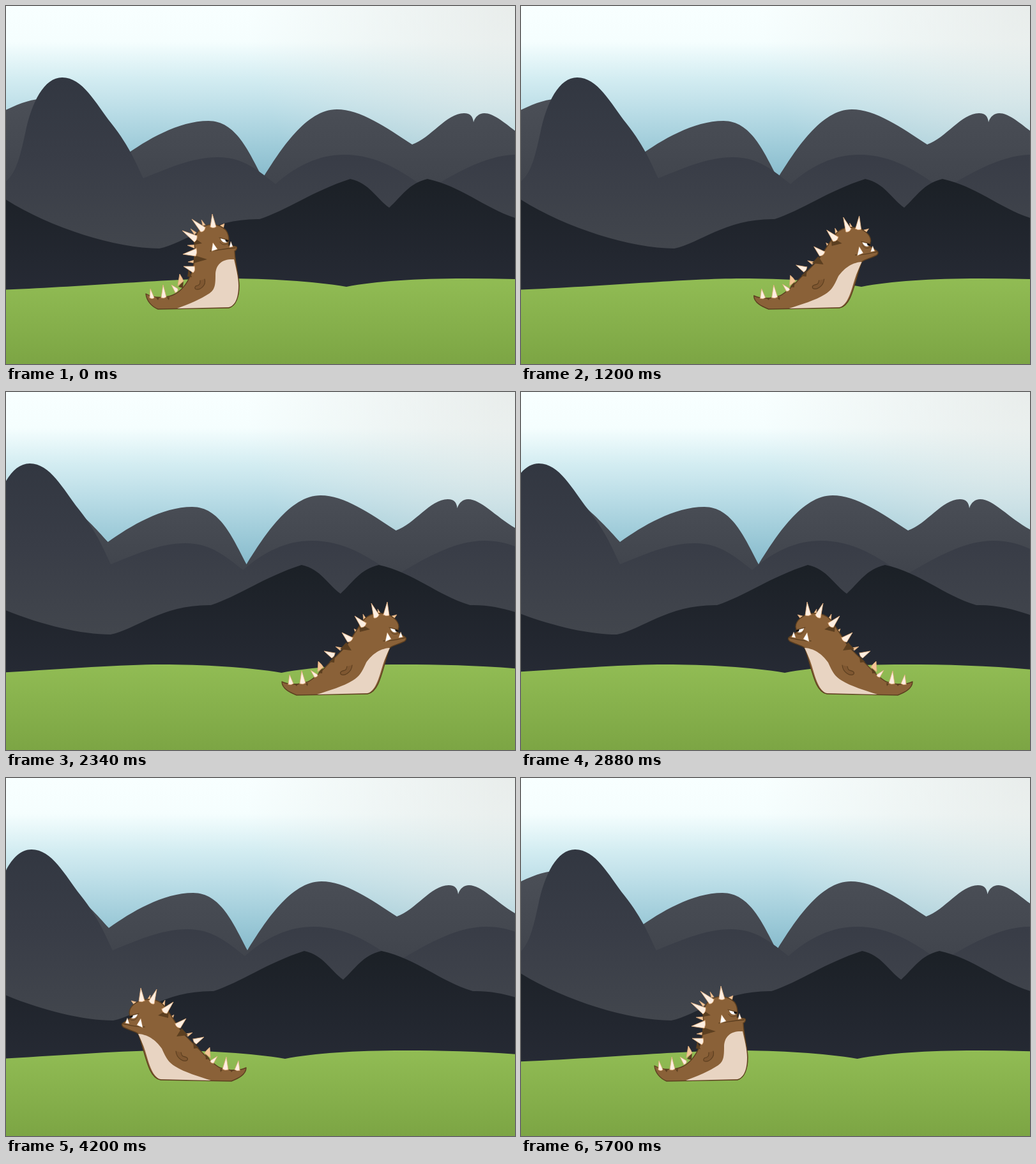
An HTML page with a canvas for the animation above (5.94 s loop, 797 by 561 pixels).

```html
<!DOCTYPE html>
<html>
<head>
<meta charset="utf-8">
<style>
html, body { margin: 0; width: 797px; height: 561px; overflow: hidden; }
canvas { display: block; }
</style>
</head>
<body>
<canvas id="stage" width="797" height="561"></canvas>
<script>
const ctx = document.getElementById('stage').getContext('2d');
const LOOP = 5940, STEP = 60;
const SPEED = 0.2217, SCROLL = 0.0304;
const clamp = (v, a, b) => Math.max(a, Math.min(b, v));

function vertical(y0, y1, ...colors) {
  const g = ctx.createLinearGradient(0, y0, 0, y1);
  colors.forEach((c, i) => g.addColorStop(i / (colors.length - 1), c));
  return g;
}

const sky = vertical(0, 280, '#f8ffff', '#f5fefe', '#d4edf2', '#b9dce6', '#9dcad8', '#82b7c9');
const haze = ctx.createRadialGradient(797, 0, 0, 797, 0, 420);
haze.addColorStop(0, 'rgba(230,234,232,.85)');
haze.addColorStop(1, 'rgba(230,234,232,0)');

// Each layer scrolls by its depth; the nearest moves fastest.
const layers = [
  [1, vertical(145, 285, '#4b4f57', '#40444c'),
    'M-10 168C20 152 40 146 60 145C100 146 150 195 185 235C220 210 270 180 317 180C360 180 380 228 402 270C430 225 470 162 518 162C555 162 595 190 636 217C665 207 690 168 717 168C728 168 731 174 732 182C735 173 741 168 749 168C772 168 800 205 840 222V561H-10Z'],
  [2, vertical(112, 380, '#323741', '#393d47', '#42464d'),
    'M-10 280C15 272 22 235 30 200C40 150 60 112 88 112C120 112 140 152 165 184C195 222 205 250 215 270C250 256 290 237 332 237C372 237 395 258 422 279C455 250 490 233 530 233C580 233 620 258 660 288C700 265 750 233 800 233C830 233 850 242 870 252V561H-10Z'],
  [3, vertical(271, 440, '#1b2026', '#262a34'),
    'M-10 297C60 345 170 380 240 380C280 372 320 333 397 334C440 320 480 290 539 271C570 278 580 302 600 316C620 298 630 278 660 271C715 283 750 318 803 334C840 333 870 343 900 354V561H-10Z'],
  [4, vertical(427, 561, '#91bc54', '#7ca544'),
    'M-10 445C120 440 260 427 345 427C410 427 480 431 533 440C580 431 640 427 720 427C790 427 860 429 930 436V561H-10Z']
].map(([depth, fill, d]) => [depth, fill, new Path2D(d)]);

const BROWN = '#8a6138', DARK = '#5c3f20', CREAM = '#fdeee1', PEACH = '#f3c596', EDGE = '#e2ae7c';

// Parts of the creature: fill, stroke, line width, upright shape, stretched shape.
const parts = [
  [PEACH, EDGE, .6,
    'M14 344L12 335L18 343ZM1 358L-5 349L4 355ZM3 374L-10 375L2 380ZM1 398L-9 401L2 403ZM41 344L48 341L46 350Z',
    'M72 350L71 340L77 349ZM49 361L48 348L55 358ZM37 380L34 371L41 375ZM12 405L5 399L16 401ZM93 351L101 349L96 356Z'],
  [BROWN, DARK, 1.4,
    'M-75 451C-62 458 -45 458 -33 453C-18 447 -10 434 -4 420C2 406 0 392 2 382C0 368 2 356 12 348C22 340 40 341 50 351C54 356 55 362 55 368L54 375L66 377C69 378 67 383 64 384C65 405 71 425 71 438C71 455 66 470 55 473L-56 475C-66 471 -74 462 -75 451Z',
    'M-79 454C-66 460 -50 458 -38 454C-26 448 -16 436 -4 424C8 412 14 406 22 398C30 386 38 372 50 356C62 344 84 344 96 354C101 358 104 363 104 368L102 376L114 384C117 386 115 391 110 392C96 398 91 398 89 403C78 435 74 470 55 473L-56 475C-66 471 -79 465 -79 454Z'],
  ['#e8d4c2', null, 0,
    'M63 397C45 396 35 404 34 420C34 438 33 444 25 450C12 459 -10 468 -26 474L55 472C66 469 70 455 70 438C70 425 66 410 63 397Z',
    'M90 401C72 402 60 414 53 424C46 440 42 446 32 452C18 461 -6 468 -24 474L55 472C69 469 75 440 79 428C82 418 86 410 90 401Z'],
  [DARK, null, 0,
    'M-1 362L13 372L1 374ZM2 391L21 397L0 403ZM-8 412L-3 425L-10 424ZM-16 430L-17 442L-24 440ZM-60 456L-56 461L-54 457ZM-42 457L-39 461L-38 456Z',
    'M42 362L59 372L43 376ZM22 392L30 405L12 403ZM4 414L3 424L-5 423ZM-15 431L-16 441L-22 440ZM-60 457L-56 461L-54 458ZM-42 457L-39 461L-38 456Z'],
  [PEACH, EDGE, .8,
    'M-25 438L-22 420Q-18 426 -16 431Z',
    'M-23 438L-22 422Q-17 426 -14 431Z'],
  [CREAM, EDGE, .8,
    'M-69 457L-68 443L-62 457Q-65 460 -69 457ZM-51 457L-48 437L-43 456Q-47 459 -51 457ZM-29 449L-35 437L-25 443Q-24 448 -29 449ZM1 408L-16 408L-1 418Q3 414 1 408ZM4 380L-17 389L3 392Q6 386 4 380ZM5 360L-18 352L1 370Q6 366 5 360ZM18 347L-3 334L11 354Q17 354 18 347ZM26 346L29 326L35 346Q30 349 26 346Z',
    'M-69 458L-67 443L-61 457Q-65 460 -69 458ZM-51 457L-48 437L-42 456Q-46 459 -51 457ZM-28 447L-34 436L-23 443Q-23 447 -28 447ZM4 409L-13 406L-1 417Q4 414 4 409ZM32 385L15 377L24 392Q31 391 32 385ZM53 362L35 351L45 369Q52 369 53 362ZM73 349L61 331L65 354Q71 355 73 349ZM80 349L86 329L89 350Q84 352 80 349Z'],
  ['#7f5731', DARK, 1.1,
    'M17 428C20 438 10 445 4 444C0 443 2 438 6 438C10 437 10 434 10 430',
    'M31 428C30 440 18 446 13 442C11 438 16 437 20 436C23 434 22 432 23 430'],
  [null, DARK, 1.4,
    'M26 384C36 383 50 380 65 379',
    'M80 390C92 391 104 387 114 385'],
  ['#ffffff', EDGE, .4,
    'M28 384L30 371L37 381ZM56 378L58 369L61 377Z',
    'M83 391L86 377L92 387ZM104 385L107 376L110 384Z'],
  ['#ffffff', null, 0,
    'M42 364L53 367L53 370C47 372 43 369 42 364Z',
    'M91 370L102 373L101 376C96 378 92 375 91 370Z'],
  ['#15110e', null, 0,
    'M49 365L55 367L53 370L50 369Z',
    'M98 371L104 373L102 376L99 375Z'],
  [null, DARK, 1,
    'M40 363L55 367M41 370C44 375 50 375 54 372',
    'M89 369L104 373M91 375C94 380 99 381 103 378']
];

const number = /-?\d+/g;
function blend(a, b, e) {
  const to = b.match(number);
  let i = 0;
  return new Path2D(a.replace(number, v => (+v + (to[i++] - v) * e).toFixed(2)));
}

// Screen position and direction of the creature.
function place(t) {
  if (t < 2490) return [Math.min(511, 294 + Math.max(0, t - 525) * SPEED), 1];
  if (t < 4940) return [Math.max(297, 534 - (t - 2880) * SPEED), -1];
  return [Math.min(284, 204 + (t - 4980) * SPEED), 1];
}

function scrolled(t) {
  const out = clamp((t - 1504) * SCROLL, 0, 30);
  return Math.max(out - Math.max(0, t - 4003) * SCROLL, out ? 1.6 : 0);
}

// How far the body leans forward, 0 to 1.
function stretch(t) {
  if (t < 180 || t >= 5700) return 0;
  if (t < 420 || t >= 5460) return .03;
  const wave = clamp(.5 + .95 * Math.cos((t - 1104) / 600 * 2 * Math.PI), 0, 1);
  return wave * clamp((t - 400) / 200, 0, 1) * clamp((5480 - t) / 120, 0, 1);
}

function drawCreature(t) {
  const [x, dir] = place(t), e = stretch(t);
  ctx.save();
  ctx.translate(x, 0);
  ctx.scale(dir, 1);
  ctx.lineJoin = ctx.lineCap = 'round';
  for (const [fill, line, width, a, b] of parts) {
    const path = blend(a, b, e);
    if (fill) { ctx.fillStyle = fill; ctx.fill(path); }
    if (line) { ctx.strokeStyle = line; ctx.lineWidth = width; ctx.stroke(path); }
  }
  ctx.restore();
}

function draw(t) {
  for (const fill of [sky, haze]) {
    ctx.fillStyle = fill;
    ctx.fillRect(0, 0, 797, 561);
  }
  const s = scrolled(t);
  for (const [depth, fill, path] of layers) {
    ctx.save();
    ctx.translate(-s * depth, 0);
    ctx.fillStyle = fill;
    ctx.fill(path);
    ctx.restore();
  }
  drawCreature(t);
}

const start = performance.now();
function tick() {
  const t = (performance.now() - start) % LOOP;
  draw(Math.floor(t / STEP) * STEP);
  requestAnimationFrame(tick);
}
tick();
</script>
</body>
</html>
```
